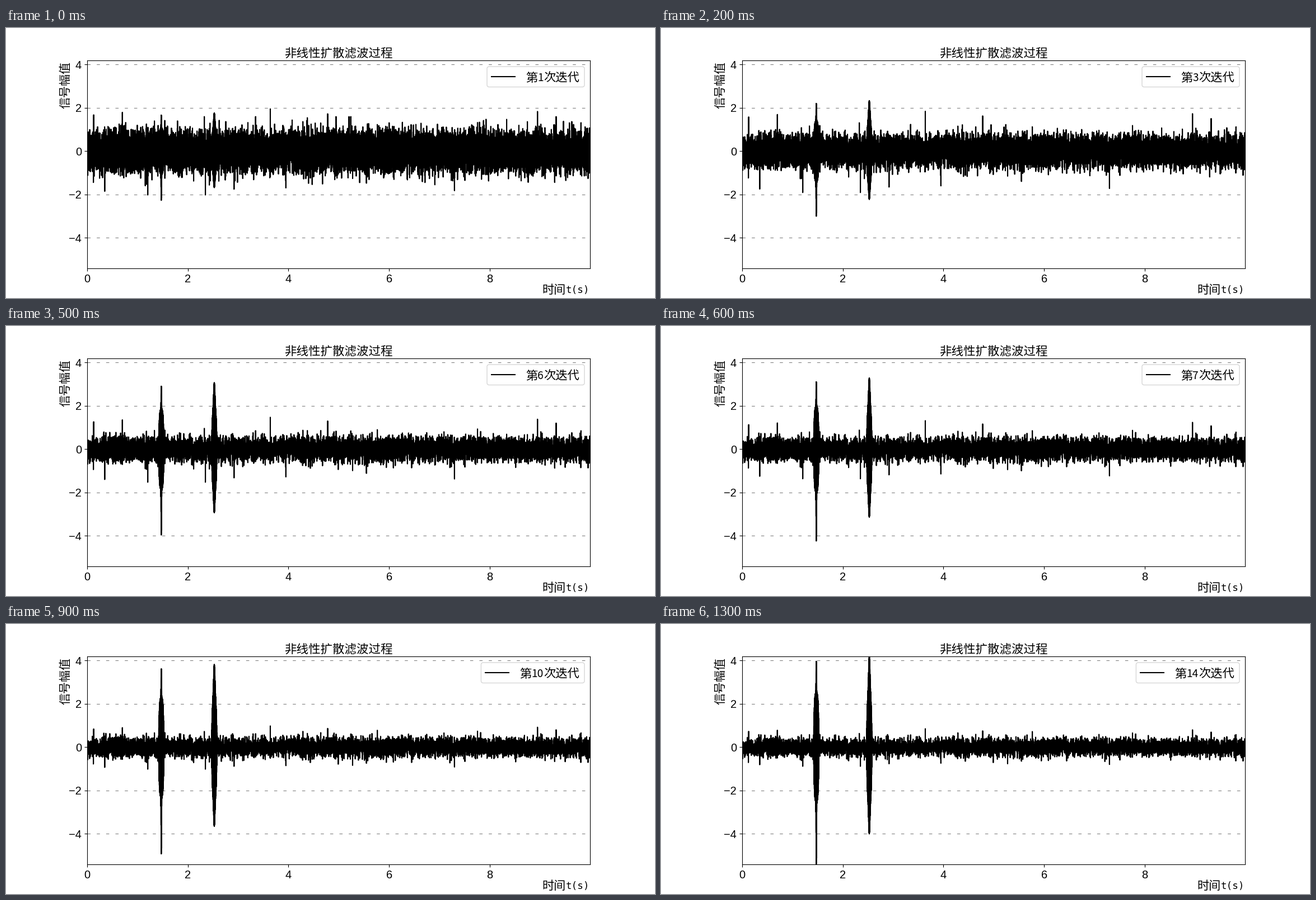
These frames come from a looping animation (1159x483 px, 1400 ms). A matplotlib script:

```python
import numpy as np
import matplotlib.pyplot as plt
from matplotlib.animation import FuncAnimation
from matplotlib.patches import FancyBboxPatch

W, H, DPI = 1159, 483, 100
ROUNDS = 14
RATE = 2000
CJK, LATIN, MONO = "Noto Sans CJK JP", "Liberation Sans", "DejaVu Sans Mono"
EM = 21.3

# Tallest noise peaks: time and starting height
SPIKES = [(0.13, 1.7), (0.35, -1.88), (0.70, 1.82), (1.205, -2.05), (2.35, -2.05),
          (2.92, -1.78), (3.64, 1.98), (3.95, -1.72), (4.78, 1.75), (5.55, -1.5),
          (7.30, -1.85), (8.95, 1.86), (9.32, 1.62)]
# Growing bursts: centre, width of the core, final top and bottom
BURSTS = [(1.474, 0.006, 3.97, -5.4), (2.527, 0.018, 4.19, -4.0)]
SHOULDER, HALF_WIDTH = 2.5, 0.055

t = np.arange(10 * RATE) / RATE
rng = np.random.default_rng(7)
white = np.clip(rng.standard_normal(t.size), -3.6, 3.6)
smooth = np.convolve(white, np.hanning(7), "same")
smooth /= smooth.std()


def burst_shape(centre, core, top, bottom):
    """Alternating samples under a broad shoulder with a tall core."""
    dt = t - centre
    shoulder = np.clip(1 - (dt / HALF_WIDTH) ** 4, 0, None)
    tip = np.exp(-(dt / core) ** 2)
    up = SHOULDER * shoulder + (top - SHOULDER) * tip
    down = -SHOULDER * shoulder + (bottom + SHOULDER) * tip
    return np.where(np.arange(t.size) % 2, up, down) * (shoulder > 0)


bursts = sum(burst_shape(*b) for b in BURSTS)
quiet = bursts == 0
spike_times, spike_heights = np.array(SPIKES).T
spike_index = np.rint(spike_times * RATE).astype(int)


def signal(k):
    fade = np.exp(-(k - 1) / 4.5)
    mix = fade * white + (1 - fade) * smooth
    y = quiet * (0.175 + 0.265 * fade) * mix / mix.std()
    y[spike_index] = spike_heights * (0.42 + 0.6 / (1 + np.exp((k - 6.3) / 1.9)))
    left = (ROUNDS - k) / (ROUNDS - 1)
    return y + bursts * (1 - 0.58 * left ** 1.6)


fig = plt.figure(figsize=((W + 1e-6) / DPI, (H + 1e-6) / DPI), dpi=DPI, facecolor="white")
ax = fig.add_axes([0.125, 0.11, 0.775, 0.77])
ax.set(xlim=(0, 9.995), ylim=(-5.405, 4.19), xticks=range(0, 9, 2), yticks=range(-4, 5, 2))
ax.tick_params(labelsize=14.4, labelfontfamily=LATIN)
ax.grid(axis="y", color="gray", linestyle=(0, (5, 10)), linewidth=0.8)
ax.set_axisbelow(True)
line, = ax.plot(t, signal(1), color="black", lw=1.5)

# Overlay in pixel coordinates for the labels and the legend
stage = fig.add_axes([0, 0, 1, 1])
stage.set(xlim=(0, W), ylim=(H, 0))
stage.axis("off")


def label(x, y, text, px=EM, font=CJK, **style):
    return stage.text(x, y, text, family=font, size=px * 72 / DPI, color="black",
                      va="baseline", **style)


label(594, 51, "非线性扩散滤波过程", px=21.5, ha="center")
label(112.3, 144, "信号幅值", px=21, rotation=90, rotation_mode="anchor")
label(957.5, 474.5, "时间", px=21.2)
label(1000, 474, "t(s)", px=17.6, font=MONO)

box = FancyBboxPatch((859, 69), 174, 36.5, boxstyle="round,pad=0,rounding_size=4",
                     fc="white", ec="0.8", lw=1, alpha=0.8)
stage.add_patch(box)
handle, = stage.plot([866, 910], [87, 87], color="black", lw=1.5, solid_capstyle="butt")
prefix = label(928, 95.5, "第")
number = label(960, 95, "1", px=19.2, ha="right")
label(960, 95.5, "次迭代")


def update(i):
    k = i + 1
    shift = 10.6 if k >= 10 else 0
    line.set_ydata(signal(k))
    box.set_bounds(859 - shift, 69, 174 + shift, 36.5)
    handle.set_xdata([866 - shift, 910 - shift])
    prefix.set_x(928 - shift)
    number.set_text(str(k))
    return line, box, handle, prefix, number


anim = FuncAnimation(fig, update, frames=ROUNDS, interval=100, repeat=True, repeat_delay=0)
plt.show()
```
